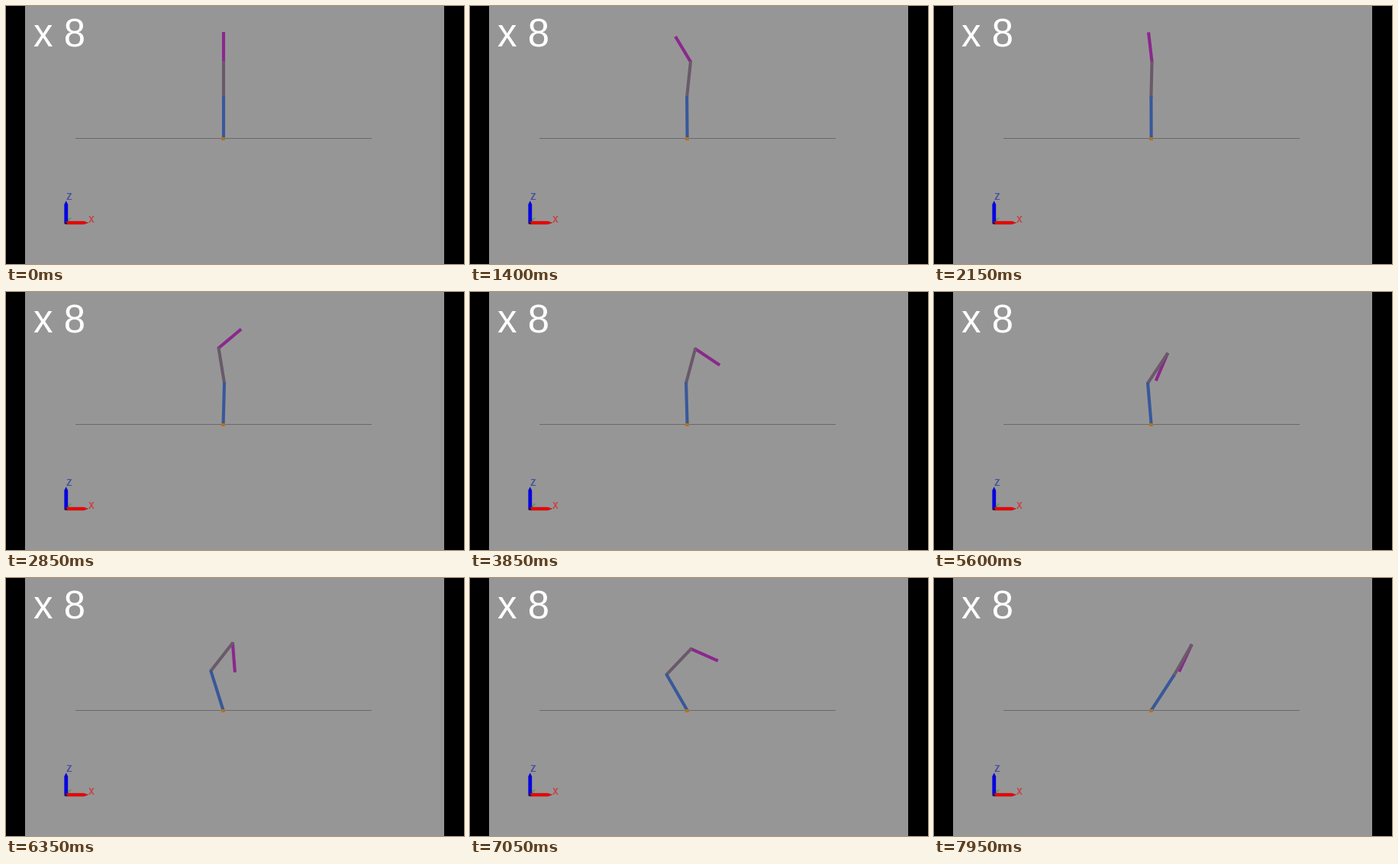
A matplotlib script that plays this animation: 600x338 px, repeating every 8000 ms.

```python
import numpy as np
import matplotlib.pyplot as plt
from matplotlib.animation import FuncAnimation
from matplotlib.patches import Polygon, Rectangle

W, H, DPI = 600, 338, 64
PT = 72 / DPI
STEP, FRAMES = 50, 160
BASE = np.array([284.6, 173.4])
LENGTHS = [54.2, 46.4, 37.6]
COLORS = ["#38589a", "#6a5a69", "#8a288c"]

# Each link swings as amplitude * cos(pi * half_turns), both eased over time.
TIMES = [0, 1.4, 2.85, 3.85, 5.6, 7.05, 7.95]
TURNS = [0, 3, 6, 8, 12, 16, 18]
LOW_TURNS = TURNS[:-1] + [19]
LOW_AMP = [0, 0.5, 1.5, -1.6, -4.8, -30, -33]
MID_AMP = [0, -6, -9.3, 15, 33.7, 43.7, 30]
TIP_AMP = [0, 31, 50, 124]
# After toppling, the tip link hangs and swings about 180 degrees.
TOPPLE, HANG_AMP = TIMES[3], 100
HANG_TURNS = [8.31, 12.574, 16.27, 18.58]


def swing(t, times, turns, amps):
    return np.interp(t, times, amps) * np.cos(np.pi * np.interp(t, times, turns))


def angles_at(t):
    low = swing(t, TIMES, LOW_TURNS, LOW_AMP)
    mid = swing(t, TIMES, TURNS, MID_AMP)
    if t < TOPPLE:
        tip = swing(t, TIMES[:4], TURNS[:4], TIP_AMP)
    else:
        turns = np.interp(t, TIMES[3:], HANG_TURNS)
        tip = 180 - HANG_AMP * np.cos(np.pi * turns)
    return np.radians([low, mid, tip])


def joints(t):
    points = [BASE]
    for length, a in zip(LENGTHS, angles_at(t)):
        points.append(points[-1] + length * np.array([np.sin(a), -np.cos(a)]))
    return points


fig = plt.figure(figsize=(W / DPI, H / DPI), dpi=DPI, facecolor="#979697")
ax = fig.add_axes([0, 0, 1, 1])
ax.set_xlim(0, W)
ax.set_ylim(H, 0)
ax.axis("off")


def rect(x, y, w, h, color, z=1):
    ax.add_patch(Rectangle((x, y), w, h, fc=color, lw=0, zorder=z))


def arrow(points, color, edge, z):
    ax.add_patch(Polygon(points, fc=color, ec=edge, lw=0.4 * PT, zorder=z))


def label(x, y, text, size, color, font, weight="normal"):
    ax.text(x, y, text, fontsize=size * PT, color=color, family=font,
            weight=weight, ha="left", va="baseline")


rect(0, 0, 25, H, "black")
rect(574, 0, 26, H, "black")
rect(91, 173, 388, 1, "#6a696a", 2)
label(36.5, 53.7, "x 8", 51, "white", "Liberation Sans")

# axis marker
ax.plot([80, 84.5], [282.5, 278], color="#5f9a60", lw=2 * PT, zorder=1)
arrow([(76.5, 285), (76.5, 260), (78.7, 255.5), (81, 260), (81, 285)],
      "#0404e8", "#1818a0", 2)
arrow([(79, 282), (102, 282), (107.5, 284), (102, 286), (79, 286)],
      "#ee0404", "#a01414", 3)
rect(77, 282.5, 3, 3, "#301848", 4)
label(78.5, 254.5, "Z", 13, "#44549a", "Liberation Mono", "bold")
label(108, 284, "X", 13, "#c84444", "Liberation Mono", "bold")

links = [ax.plot([], [], color=c, lw=4.1 * PT, solid_capstyle="butt",
                 zorder=8 - i)[0] for i, c in enumerate(COLORS)]
rect(282.2, 171.8, 5, 3.7, "#b0741f", 9)


def draw(frame):
    p = joints(frame * STEP / 1000)
    for link, a, b in zip(links, p, p[1:]):
        pad = (b - a) / np.linalg.norm(b - a)
        a, b = a - pad, b + pad
        link.set_data([a[0], b[0]], [a[1], b[1]])
    return links


anim = FuncAnimation(fig, draw, frames=FRAMES, interval=STEP, repeat=True,
                     repeat_delay=0, blit=False)
plt.show()
```
